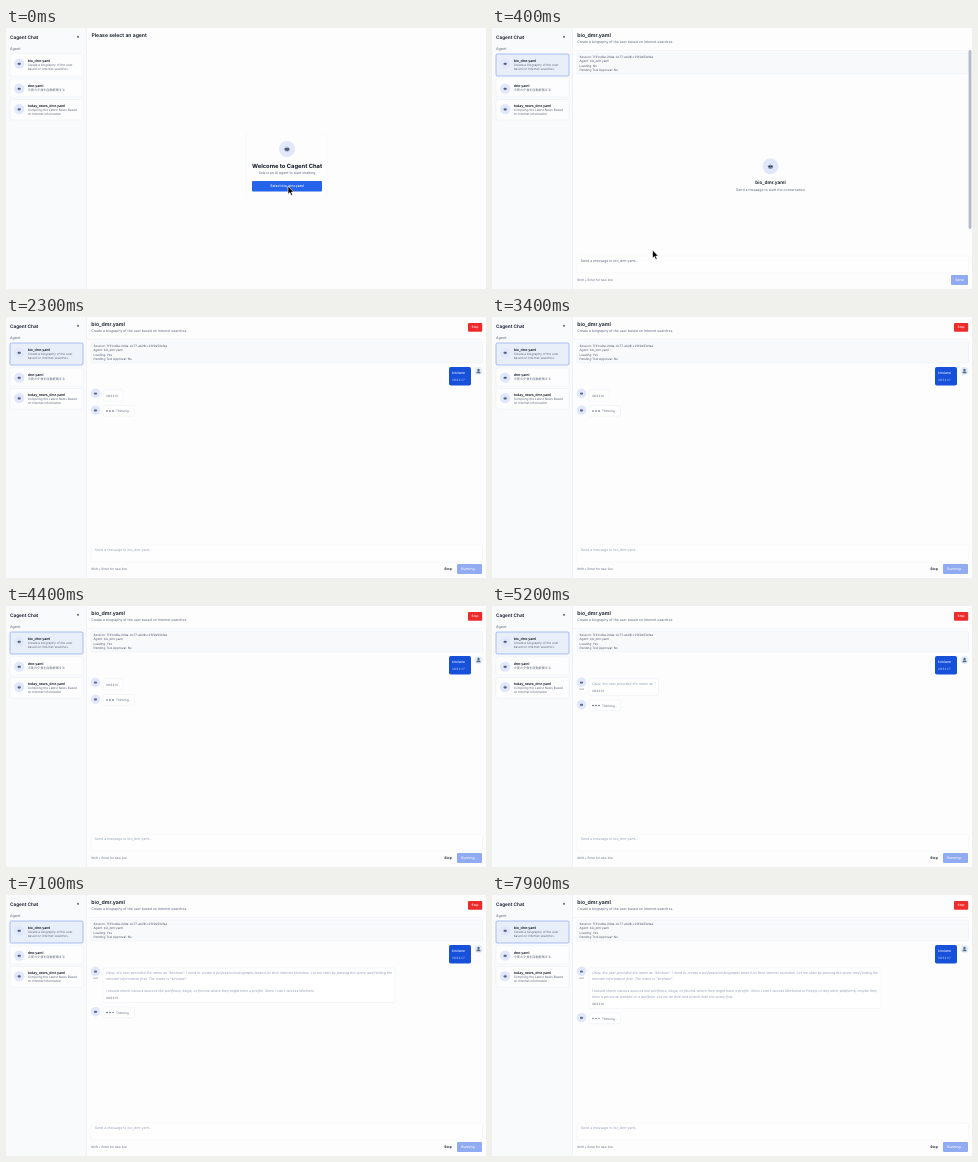
These frames come from a looping animation (480 px wide and 261 px high, 8 s). An HTML page:

```html
<!DOCTYPE html>
<html lang="en">
<head>
<meta charset="utf-8">
<title>Agent chat</title>
<style>
  html, body { margin: 0; width: 100%; height: 100%; overflow: hidden; background: #fdfdfd; }
  svg { display: block; width: 480px; height: 261px; }
  text { font-family: Inter, "Noto Sans CJK JP", "Noto Sans CJK", sans-serif; text-rendering: geometricPrecision; white-space: pre; }
</style>
</head>
<body>
<svg id="stage" viewBox="0 0 480 261" xmlns="http://www.w3.org/2000/svg">
  <defs>
    <g id="bot">
      <circle r="8" fill="#e1e8fc"/>
      <path d="M0-2.6V-1.4" stroke="#8b97ad" stroke-width=".6"/>
      <rect x="-2.4" y="-1.4" width="4.8" height="3.6" rx="1.1" fill="#8592aa"/>
      <path d="M-2.7 .2H2.7M-1.3 1.7H1.3" stroke="#4c5a74" stroke-width=".7"/>
      <circle cx="-1" cy="0" r=".65" fill="#1d2a42"/>
      <circle cx="1" cy="0" r=".65" fill="#1d2a42"/>
    </g>
    <g id="person">
      <circle r="4" fill="#e3edf7"/>
      <circle cy="-1" r="1.2" fill="#4f6b86"/>
      <path d="M-2.2 2.3Q-2 .3 0 .3T2.2 2.3Z" fill="#4f6b86"/>
    </g>
  </defs>
</svg>
<script>
const LOOP = 8000, STEP = 100;
const OPEN = 200, TYPE = 600, SEND = 1000, REPLY = 1100, STREAM = 4975;
const CHARS_PER_MS = 0.165;
const INK = "#0f1424", MUTED = "#626b7e", PALE = "#9aa4bd", LINE = "#e9edf3";
const BLUE = "#1751da", DISABLED = "#91abf3";
const FILE = "bio_dmr.yaml", USER = "kirolane";
const ABOUT = "Create a biography of the user based on Internet searches.";
const PROMPT = `Send a message to ${FILE}...`;
const REPLY_LINES = [
  [78, `Okay, the user provided the name as "${USER}". I need to create a professional biography based on their internet searches. Let me start by parsing the query and finding the`],
  [84, `relevant information first. The name is "${USER}".`],
  [96, "I should check various sources like portfolios, blogs, or forums where they might have a profile. Since I can't access Worknest or Peeply or any other platforms, maybe they"],
  [102, "have a personal website or a portfolio. Let me do that and search with the query first."]
];
const POINTER = [[0, 282, 158], [200, 282, 158], [400, 160.5, 222], [700, 160.5, 222], [900, 467, 251], [1100, 470, 240]];
const stage = document.getElementById("stage");

function make(tag, attrs, parent = stage) {
  const el = document.createElementNS("http://www.w3.org/2000/svg", tag);
  set(el, attrs);
  parent.append(el);
  return el;
}
function set(el, attrs) {
  for (const key in attrs) el.setAttribute(key, attrs[key]);
}
function show(el, on) {
  el.style.display = on ? "" : "none";
}
const group = parent => make("g", {}, parent);

function box(parent, x, y, width, height, fill, more = {}) {
  return make("rect", { x, y, width, height, fill, ...more }, parent);
}
// y is the middle of the lowercase letters
function label(parent, x, y, size, str, fill = INK, weight = 400, anchor = "start") {
  const el = make("text", { x, y: y + size * 0.33, "font-size": size, fill, "font-weight": weight, "text-anchor": anchor }, parent);
  el.textContent = str;
  return el;
}
function icon(parent, x, y, scale = 1, id = "bot") {
  return make("use", { href: "#" + id, transform: `translate(${x} ${y}) scale(${scale})` }, parent);
}
function button(parent, x, y, w, h, str, fill, size = 3.4) {
  const g = group(parent);
  box(g, x, y, w, h, fill, { rx: 1 });
  label(g, x + w / 2, y + h / 2, size, str, "#fff", 500, "middle");
  return g;
}
const bubble = (parent, y, w, h) =>
  box(parent, 97, y, w, h, "#fff", { rx: 1.5, stroke: LINE, "stroke-width": 0.5 });

// Sidebar
box(stage, 0, 0, 80.5, 261, "#f8fafb");
box(stage, 80, 0, 0.6, 261, LINE);
label(stage, 4, 9, 4.7, "Cagent Chat", INK, 600);
label(stage, 70.8, 9, 4, "«", INK, 600);
label(stage, 4, 20.3, 3.7, "Agent", MUTED);
const cards = [
  [26, 22, FILE, ["Create a biography of the user", "based on Internet searches."]],
  [51, 18, "dmr.yaml", ["今夜の夕食を自動提案する"]],
  [71.5, 20.5, "today_news_dmr.yaml", ["Compiling the Latest News Based", "on Internet information"]]
].map(([y, h, name, about]) => {
  const card = box(stage, 4, y, 73, h, "#fdfdfd", { rx: 1.5, stroke: LINE, "stroke-width": 0.5 });
  icon(stage, 13.2, y + 9.6, 0.65);
  label(stage, 21.7, y + 6.6, 3.5, name, INK, 600);
  about.forEach((line, i) => label(stage, 21.7, y + 10.9 + i * 4, 3.12, line, MUTED));
  return card;
});

// Welcome view
const welcome = group();
label(welcome, 85.5, 7.1, 5.1, "Please select an agent", INK, 600);
box(welcome, 240, 105, 81, 64, "none", { rx: 2, stroke: "#f3f5f8", "stroke-width": 0.5 });
icon(welcome, 281, 121);
label(welcome, 281, 137.6, 5.8, "Welcome to Cagent Chat", INK, 700, "middle");
label(welcome, 281, 144.6, 3.5, "Select an AI agent to start chatting", MUTED, 400, "middle");
button(welcome, 246, 153, 70, 10.4, "Select " + FILE, "#2563eb", 3.5);

// Chat view
const chat = group();
label(chat, 85.3, 7, 5.2, FILE, INK, 600);
label(chat, 85.3, 14.2, 3.45, ABOUT, MUTED);
box(chat, 81, 22, 395, 0.5, LINE);
box(chat, 85, 25, 391.5, 21, "#f7f9fb", { rx: 1.5, stroke: LINE, "stroke-width": 0.5 });
["Session: 7f21ce8a-2d4a-4c77-ab28-c23f2e53efae", "Agent: " + FILE, "Loading: ", "Pending Tool Approval: No"]
  .forEach((line, i) => label(chat, 87.5, 29.3 + i * 4.1, 3.05, line, "#4e576a"));
const loading = chat.querySelectorAll("text")[4];
box(chat, 85, 228, 391.5, 17, "#fefefe", { rx: 1.5, stroke: "#f1f3f7", "stroke-width": 0.5 });
const field = label(chat, 88.7, 233.3, 3.52, PROMPT, MUTED);
label(chat, 85.3, 252, 3.05, "Shift + Enter for new line", MUTED);

const empty = group(chat);
icon(empty, 278.5, 138.3);
label(empty, 278.5, 154, 4.7, FILE, INK, 600, "middle");
label(empty, 278.5, 162, 3.52, "Send a message to start the conversation", MUTED, 400, "middle");
box(empty, 476.6, 22, 2.8, 179, "#b4b9c9", { rx: 1.4 });
const send = button(empty, 459, 247, 17, 10, "Send", DISABLED);

const running = group(chat);
button(running, 462, 6, 14.2, 8.8, "Stop", "#ee2b2b", 3.2);
button(running, 451, 247, 25, 10, "Running...", DISABLED);
label(running, 442, 252, 3.4, "Stop", INK, 600, "middle");
box(running, 443, 50, 22, 18.5, BLUE, { rx: 1.8 });
label(running, 446, 56, 3.5, USER, "#fff");
label(running, 446, 63, 3, "08:52:07", "#b5caf7");
icon(running, 472.5, 54, 1, "person");

const reply = group(running);
icon(reply, 89.5, 76.3, 0.6);
const role = label(reply, 89.5, 83.3, 2.6, "root", MUTED, 400, "middle");
const replyBox = bubble(reply, 72.8, 20, 11.5);
const lines = REPLY_LINES.map(([y, str]) => {
  const el = label(reply, 100, y, 3.5, str, "#949db3");
  el.setAttribute("font-style", "italic");
  return el;
});
const stamp = label(reply, 100, 79, 3, "08:52:10", MUTED);

const thinking = group(running);
icon(thinking, 89.5, 0, 0.6);
bubble(thinking, -4.6, 31.5, 10.6);
const dots = [101, 104, 107].map(cx => make("circle", { cx, cy: 0.8, r: 0.8, fill: "#454d5e" }, thinking));
label(thinking, 110, 0.8, 3.1, "Thinking...", MUTED);

// Pointers
const arrow = make("path", {
  d: "M0 0V8.2L1.9 6.5L3.2 9.4L4.6 8.8L3.3 6H5.8Z",
  fill: "#000", stroke: "#fff", "stroke-width": 0.6
});
const busy = group();
make("circle", { r: 3.1, fill: "#20232b", stroke: "#fff", "stroke-width": 0.5 }, busy);
make("path", { d: "M-.2-1.4V.3L1 1", fill: "none", stroke: "#eee", "stroke-width": 0.6 }, busy);

function along(path, t) {
  const i = path.findIndex(p => p[0] > t);
  if (i < 0) return path[path.length - 1].slice(1);
  const [a, b] = [path[i - 1], path[i]];
  const u = (t - a[0]) / (b[0] - a[0]);
  return [1, 2].map(k => a[k] + (b[k] - a[k]) * u);
}

function drawReply(t) {
  let left = Math.max(0, Math.floor((t - STREAM) * CHARS_PER_MS));
  let width = 14, stampY = 79;
  REPLY_LINES.forEach(([y, str], i) => {
    const part = str.slice(0, left);
    left = Math.max(0, left - str.length);
    lines[i].textContent = part;
    if (!part) return;
    stampY = y + 6.5;
    width = Math.max(width, lines[i].getComputedTextLength());
  });
  set(replyBox, { width: width + 6, height: stampY + 5 - 72.8 });
  set(stamp, { y: stampY + 1 });
  show(role, t > STREAM);
  set(thinking, { transform: `translate(0 ${stampY + 14.2})` });
  dots.forEach((dot, i) => set(dot, { opacity: 0.8 + 0.2 * Math.cos((t - 1200) / 1000 * Math.PI * 2 - i * 0.6) }));
}

function draw(t) {
  const opened = t >= OPEN, sent = t >= SEND;
  show(welcome, !opened);
  show(chat, opened);
  show(empty, !sent);
  show(running, sent);
  show(reply, t >= REPLY);
  set(cards[0], opened
    ? { fill: "#e9eff9", stroke: "#5f86ea" }
    : { fill: "#fdfdfd", stroke: LINE });

  const typed = !sent && t >= TYPE ? USER.slice(0, (t - TYPE) / 25) : "";
  field.textContent = typed || PROMPT;
  set(field, { fill: typed ? INK : sent ? PALE : MUTED });
  set(send.firstChild, { fill: typed ? BLUE : DISABLED });
  loading.textContent = "Loading: " + (sent ? "Yes" : "No");

  set(arrow, { transform: `translate(${along(POINTER, t)})` });
  show(arrow, t < REPLY);
  set(busy, { transform: `translate(${471 + Math.max(0, t - 1300) * 0.06} 239.5)` });
  show(busy, t >= REPLY && t < 1600);
  drawReply(t);
}

const start = performance.now();
function tick() {
  const t = (performance.now() - start) % LOOP;
  draw(Math.floor(t / STEP) * STEP);
  requestAnimationFrame(tick);
}
tick();
</script>
</body>
</html>
```
